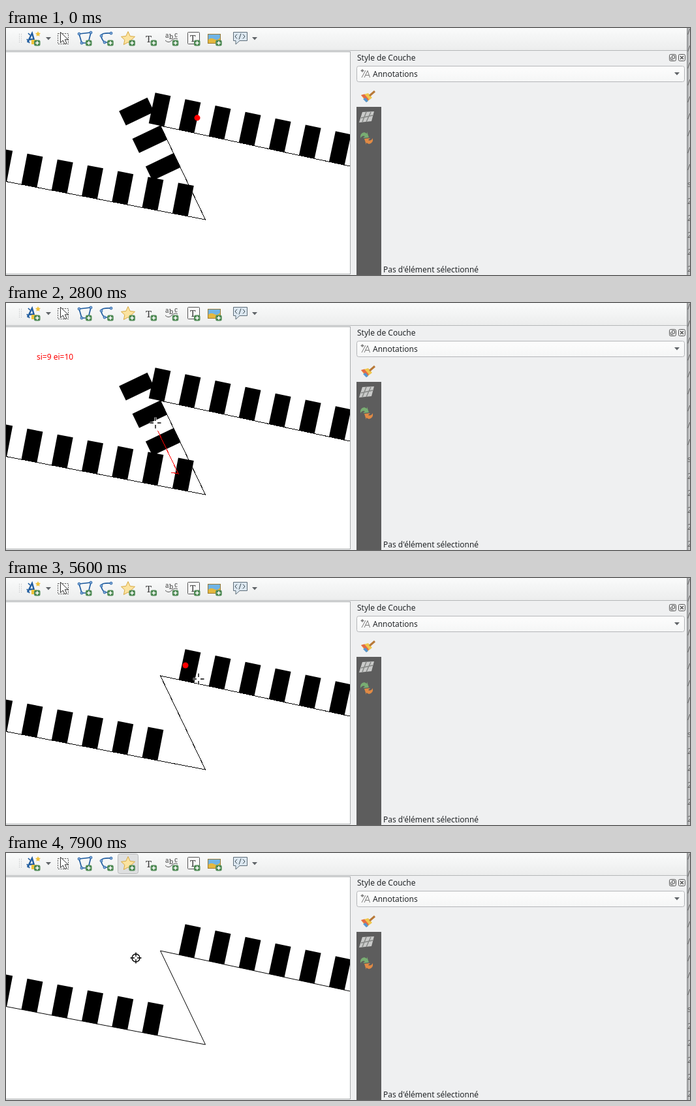
An HTML page that plays this animation: 1048 px wide and 379 px high, repeating every 8 s.

```html
<!DOCTYPE html>
<html lang="fr">
<head>
<meta charset="utf-8">
<title>Annotations</title>
<style>
  html, body { margin: 0; width: 100%; height: 100%; overflow: hidden; background: #eff0f1; }
  svg { display: block; }
  text { font-family: "Noto Sans", sans-serif; font-size: 12px; fill: #232629; }
  .line { fill: none; stroke: #555; }
  .rungs { fill: none; stroke: #000; stroke-width: 48; stroke-dasharray: 24.3 22.8; }
  .red { fill: none; stroke: #f00; shape-rendering: crispEdges; }
  .halo { fill: none; stroke: #fff; stroke-width: 3.2; }
  .ink { fill: none; stroke: #000; stroke-width: 1.4; }
  .blue { fill: none; stroke: #1f5c9f; stroke-width: 1.7; }
  .node { fill: #7da7d8; stroke: #1f5c9f; stroke-width: .8; }
  .edge { fill: none; stroke: #b4b6b8; }
  .serif { font-family: "Noto Serif", serif; fill: #3c3c3c; }
</style>
</head>
<body>
<svg width="1048" height="379" viewBox="0 0 1048 379">
  <defs>
    <linearGradient id="bar" x2="0" y2="1"><stop stop-color="#fafbfb"/><stop offset="1" stop-color="#eceded"/></linearGradient>
    <linearGradient id="field" x2="0" y2="1"><stop stop-color="#fdfdfd"/><stop offset="1" stop-color="#f5f6f6"/></linearGradient>
    <linearGradient id="shade"><stop stop-color="#8d8f91"/><stop offset="1" stop-color="#d6d7d8"/></linearGradient>
    <g id="plus"><rect x="-5" y="-4.5" width="9.5" height="9" rx="2.5" fill="#4f8a55"/><path d="M-3 0H2.6M-.2-2.8V2.8" stroke="#fff" stroke-width="1.6"/></g>
    <path id="drop" d="M-4-2H4L0 2.5Z" fill="#606468"/>
    <path id="pointer" d="M0 0V16L3.8 12.5 6.5 18.2 9.4 17 6.8 11.3H11.8Z"/>
    <path id="crossLines" d="M-8.5 0H-3M3 0H8.5M0-8.5V-3M0 3V8.5"/>
    <path id="targetLines" d="M-8.5 0H-2M2 0H8.5M0-8.5V-2M0 2V8.5M-6 0a6 6 0 1 0 12 0a6 6 0 1 0-12 0"/>
  </defs>

  <!-- map canvas -->
  <rect y="36" width="528" height="342" fill="#a9abad"/>
  <svg y="37" width="527" height="340" viewBox="0 37 527 340">
    <rect y="37" width="527" height="340" fill="#fff"/>
    <path id="base" class="line" style="stroke:#000" d="M-20 231.7L305.5 294 236.5 150 547 216.3"/>
    <path class="rungs" d="M-18.2 207.5L236.8 256.6M269.6 132.6L560 194.6"/>
    <path id="cut" class="rungs" d="M223.7 122.8l23.7 5M259.4 261l23.8 4.6M246 224L194.8 117"/>
    <polyline id="track" class="red"/>
    <circle id="dot" r="4.5" fill="#f00"/>
    <text id="info" x="47" y="87" style="fill:#f00"></text>
  </svg>

  <!-- toolbar -->
  <rect width="1043" height="34" fill="url(#bar)"/>
  <path d="M0 34.5H1043" class="edge"/>
  <path d="M20.5 9V24M23.5 9V24" stroke="#b0b2b4" stroke-dasharray="1 2"/>
  <rect id="pressed" x="171.5" y="1.5" width="31" height="30" rx="3" fill="#dedfe0" stroke="#b9babb"/>
  <path class="blue" style="stroke-width:2.4" d="M33 22L40 8 44 22M36 17.5H43"/>
  <path class="blue" d="M32 17l4 6M34 8l3 3"/>
  <path d="M49 5l1.2 2.6 2.8.4-2 2 .5 2.8-2.5-1.3-2.5 1.3.5-2.8-2-2 2.8-.4ZM39 18h8v7h-8Z" fill="#f0c33c"/>
  <use href="#drop" x="65" y="16"/>
  <rect x="79.5" y="8.5" width="16" height="16" class="line" stroke-dasharray="2 1.5"/>
  <use href="#pointer" x="83.5" y="6.5" fill="#fff" stroke="#333"/>
  <path class="blue" d="M112 9L130 7 126 23 116 23Z"/>
  <path class="blue" d="M161 8Q146 7 146 12T151 22H160"/>
  <g class="node">
    <circle cx="112" cy="9" r="2"/><circle cx="130" cy="7" r="2"/><circle cx="116" cy="23" r="2"/>
    <circle cx="161" cy="8" r="2"/><circle cx="146" cy="12" r="2"/><circle cx="151" cy="22" r="2"/>
  </g>
  <path d="M187 5.5l3.2 7 7.3.8-5.4 5 1.5 7.2-6.6-3.7-6.6 3.7 1.5-7.2-5.4-5 7.3-.8Z" fill="#fbe3a0" stroke="#d9a93f"/>
  <text class="serif" x="214" y="22" style="font-size:15px">T</text>
  <text class="serif" style="font-size:10px"><tspan x="244" y="15">a</tspan><tspan x="250" y="17">b</tspan><tspan x="258" y="14">c</tspan></text>
  <path class="line" d="M244 19q5 5 10 0t9-2"/>
  <rect x="278.5" y="6.5" width="18" height="18" rx="1" fill="#f8f8f8" stroke="#555"/>
  <text class="serif" x="282" y="21" style="font-size:14px">T</text>
  <rect x="309.5" y="9.5" width="19" height="14" fill="#70b4e6" stroke="#9a7b35"/>
  <path d="M310 18q4-4 9-1t9-2v8h-18Z" fill="#e4b83e"/>
  <path d="M348.500 6.500H369.500V19.500H358L352 25V19.500H348.500Z" fill="#dde8f1" stroke="#5d6c78"/>
  <path class="line" style="stroke:#37474f" d="M354 9.500L351 13l3 3.500M363 9.500L366 13l-3 3.500M360 8.500l-3 9"/>
  <use href="#drop" x="381" y="16"/>
  <use href="#plus" x="48" y="23"/>
  <g id="pluses"></g>

  <!-- style panel -->
  <text x="538" y="50">Style de Couche</text>
  <g class="line">
    <rect x="1016.500" y="40.500" width="10" height="10" rx="2"/><rect x="1030.500" y="40.500" width="10" height="10" rx="2"/>
    <path d="M1020.500 42.500H1024.500V46.500H1020.500ZM1018.500 44.500V48.500H1022.500"/>
    <path stroke-width="1.5" d="M1033 43l5 5M1038 43l-5 5"/>
  </g>
  <rect x="537.5" y="58.5" width="502" height="24" rx="3" fill="url(#field)" stroke="#b4b6b8"/>
  <path class="line" style="stroke:#777" d="M549 76L554 65.500 557.500 76M551 72.500H556M545 76L551 65M546 63v5M543.500 65.500h5M544.500 64l3 3M547.500 64l-3 3"/>
  <text x="562" y="75">Annotations</text>
  <use href="#drop" x="1028" y="70"/>
  <rect x="537" y="121" width="38" height="258" fill="#5d5d5d"/>
  <path d="M544 103L555 100 561 107 552 114Z" fill="#f0c74c"/>
  <path d="M544 103l5-1.500 7 8-3 3Z" fill="#e46a48"/>
  <path d="M547 109l4-2 4 5-3 2Z" fill="#5596d0"/>
  <path d="M557 104L565 97" stroke="#b87938" stroke-width="3"/>
  <path d="M546 129L564 128 560 143 541 145Z" fill="#c9cac9"/>
  <path d="M546 144l6-15M552 144l7-15M544 138l18-4" stroke="#858785" stroke-width="1.5"/>
  <path d="M543 169q-1-8 6-9l4 2v-3l3 9-9 1 3-3q-4-2-7 3Z" fill="#78ad72"/>
  <path d="M562 169q1 8-6 9l-4-2v3l-3-9 9-1-3 3q4 2 7-3Z" fill="#e08a45"/>
  <text x="578" y="375">Pas d'élément sélectionné</text>

  <!-- neighbouring window -->
  <rect x="1043" width="5" height="379" fill="url(#shade)"/>
  <g id="strip"></g>

  <g id="cross"><use href="#crossLines" class="halo"/><use href="#crossLines" class="ink"/></g>
  <g id="target"><use href="#targetLines" class="halo"/><use href="#targetLines" class="ink"/></g>
  <g id="arrow"><use href="#pointer" fill="#000" stroke="#fff" stroke-width=".7"/></g>
</svg>
<script>
const $ = id => document.getElementById(id);
const show = (id, on) => $(id).style.display = on ? '' : 'none';
const place = (id, [x, y]) => $(id).setAttribute('transform', `translate(${x} ${y})`);
const repeat = (id, count, item) => $(id).innerHTML = Array.from({ length: count }, (_, i) => item(i)).join('');

repeat('pluses', 7, i => `<use href="#plus" x="${127 + 33.2 * i}" y="23"/>`);
repeat('strip', 15, i => `<text x="1044" y="${9.5 + 26 * i}" style="fill:#666">${i < 9 ? '/' : i == 9 ? 's' : '2'}</text>`);

const LOOP = 8000, STEP = 100;
const ENTER = 300, TRACE = 1700, CUT = 4900, SWITCH = 6900;

// Pointer gestures: each eases along a curve from where the last one ended
const home = [293, 138];
const gestures = [];
function move(from, to, end, bend) {
  const start = gestures.length ? gestures.at(-1).end : home;
  bend ??= start.map((v, i) => (v + end[i]) / 2);
  gestures.push({ from, to, start, bend, end });
}
move(200, ENTER, [328, 325]);
move(ENTER, 600, [261, 257]);
move(700, 1200, [252, 260], [237, 259]);
move(2000, 2800, [229, 184], [362, 285]);
move(2800, 3600, [243, 128], [160, 100]);
move(3700, 4000, [253, 129]);
move(5500, 5600, [295, 155]);
move(5600, 5900, [600, 60]);
move(5900, 6400, [120, 70], [-60, 380]);
move(6400, SWITCH, [182, 18], [130, 18]);
move(7000, 7400, [167, 93], [148, 60]);
move(7500, 7900, [199, 161]);

function pointerAt(t) {
  const g = gestures.findLast(g => t >= g.from);
  if (!g) return home;
  const f = Math.min(1, (t - g.from) / (g.to - g.from));
  const u = f * f * (3 - 2 * f), v = 1 - u;
  return g.start.map((s, i) => v * v * s + 2 * u * v * g.bend[i] + u * u * g.end[i]);
}

// Centre line of the rungs, before and after the cut
const left = [-50, 201.8], right = [560, 194.9];
const whole = [left, [264, 262], [198, 124], [202, 118.4], right];
const parts = [[left, [242, 258]], [[275, 134], right]];

function nearest(line, [x, y]) {
  let best = { dist: Infinity };
  for (let seg = 0; seg + 1 < line.length; seg++) {
    const [[ax, ay], [bx, by]] = [line[seg], line[seg + 1]];
    const dx = bx - ax, dy = by - ay;
    const f = Math.max(0, Math.min(1, ((x - ax) * dx + (y - ay) * dy) / (dx * dx + dy * dy)));
    const point = [ax + dx * f, ay + dy * f];
    const dist = Math.hypot(x - point[0], y - point[1]);
    if (dist < best.dist) best = { dist, seg, point };
  }
  return best;
}

function draw(t) {
  t = Math.floor(t / STEP) * STEP;
  const pos = pointerAt(t), lagged = pointerAt(t - STEP);
  const onMap = pos[0] < 528 && pos[1] > 36;
  const tracing = t >= TRACE && t < CUT;
  const lines = t < CUT ? [whole] : parts;
  const snap = lines.map(l => nearest(l, lagged)).sort((a, b) => a.dist - b.dist)[0];

  show('cross', t >= ENTER && onMap && t < SWITCH);
  show('target', onMap && t >= SWITCH);
  show('arrow', !onMap);
  for (const id of ['cross', 'target', 'arrow']) place(id, pos);

  show('dot', !tracing && onMap && t < 6500);
  place('dot', snap.point);
  show('track', tracing);
  show('info', tracing);
  if (tracing) {
    $('track').setAttribute('points', [[253, 260], ...whole.slice(1, snap.seg + 1), snap.point].join(' '));
    $('info').textContent = `si=${10 - snap.seg} ei=10`;
  }
  show('cut', t < CUT);
  show('pressed', t >= 6600);
  $('base').style.shapeRendering = t < SWITCH ? 'crispEdges' : 'auto';
}

function tick() {
  draw(performance.now() % LOOP);
  requestAnimationFrame(tick);
}
tick();
</script>
</body>
</html>
```
